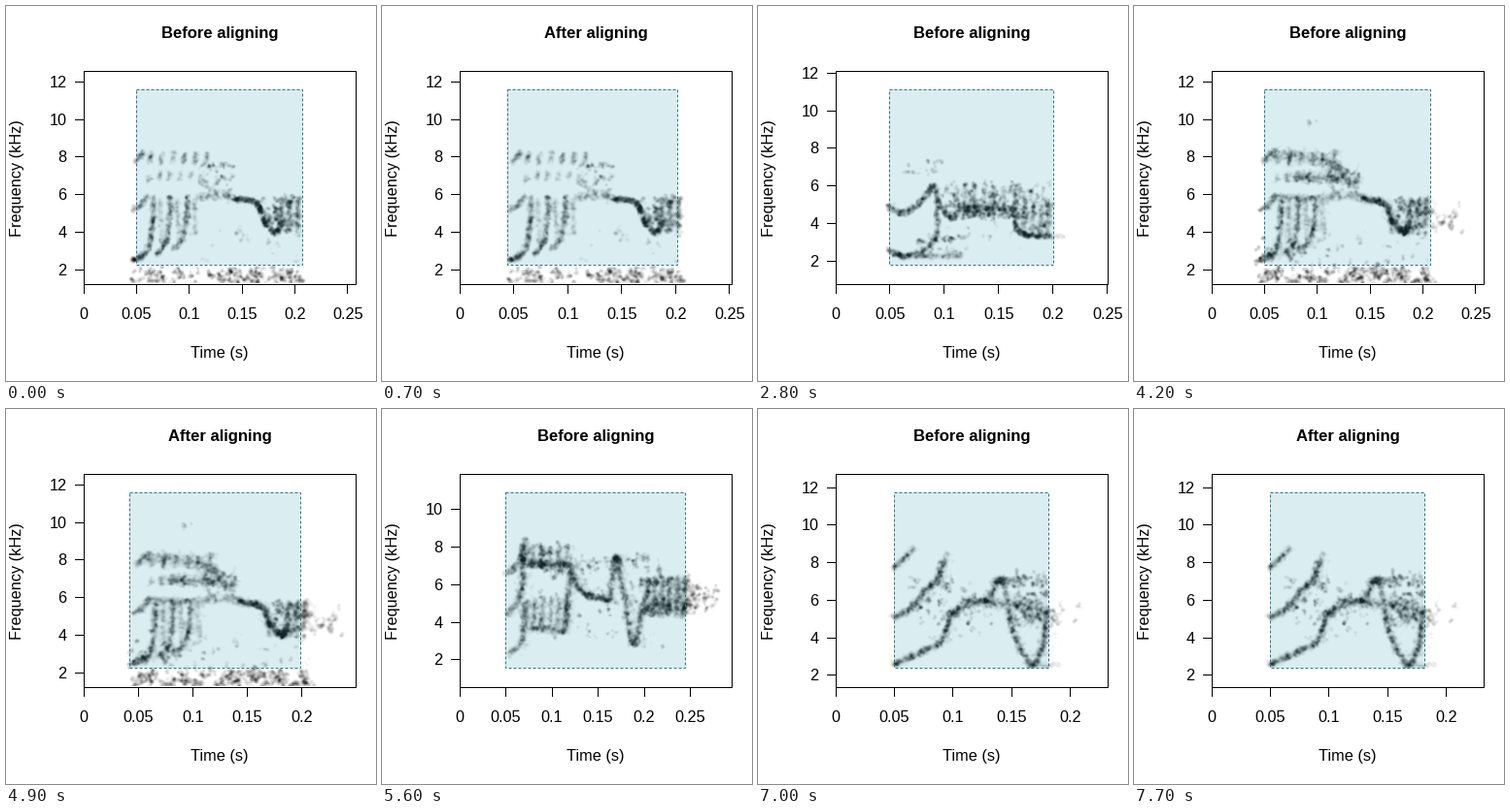
Recreate the animation shown at these times as a matplotlib script. Size 381 by 387 pixels, loop 8 s.

```python
import numpy as np
import matplotlib.pyplot as plt
from matplotlib.animation import FuncAnimation
from matplotlib.patches import Rectangle

W, H, DPI = 381, 387, 100
L, R, T, B = 79.5, 359.5, 66.5, 286.5  # plot frame in pixels
COLS, ROWS = int(R - L), int(B - T)
KHZ = ROWS / 11.35                     # pixels per kHz
PT = 72 / DPI
PAD = 0.05                             # margin around the selection, seconds
TEAL = "#07889B"

plt.rcParams["font.family"] = "Liberation Sans"


def blur(g, sigma):
    k = np.exp(-0.5 * (np.arange(-6, 7) / sigma) ** 2)
    for axis in (0, 1):
        g = np.apply_along_axis(np.convolve, axis, g, k / k.sum(), "same")
    return g


class Spectrogram:
    """Soft, grainy ink built from random stamps, in pixel coordinates."""

    def __init__(self, seed, wet):
        self.rng = np.random.default_rng(seed)
        self.wet = wet
        self.grid = np.zeros((ROWS, COLS))

    def stamp(self, x, y, weight):
        i, j = np.floor(y - T).astype(int), np.floor(x - L).astype(int)
        ok = (i >= 0) & (i < ROWS) & (j >= 0) & (j < COLS)
        np.add.at(self.grid, (i[ok], j[ok]), weight[ok])

    def curve(self, *keys, ink=0.7, width=1.3):
        """Smooth trace through a few key points; echoes smear it when wet."""
        p = np.array(keys, float)
        d = np.r_[0, np.cumsum(np.hypot(*np.diff(p, axis=0).T))]
        m = np.gradient(p, d, axis=0)
        n = int(d[-1] * 4)
        s = self.rng.uniform(0, d[-1], n)
        k = np.clip(np.searchsorted(d, s) - 1, 0, len(d) - 2)
        h = (d[k + 1] - d[k])[:, None]
        u = (s - d[k])[:, None] / h
        ease = u * u * (3 - 2 * u)
        q = (p[k] * (1 - ease) + p[k + 1] * ease
             + h * u * (1 - u) * (m[k] * (1 - u) - m[k + 1] * u))
        x, y = (q + self.rng.normal(0, width, q.shape)).T
        w = ink * 0.65 * np.hypot(1.3, width) * self.rng.uniform(0.4, 1.6, n)
        self.stamp(x, y, w * (0.85 if self.wet else 1))
        if self.wet:
            lag = self.rng.normal(-2, 2.5, n) + self.rng.exponential(4, n)
            self.stamp(x + lag, y + self.rng.normal(0, 1.2, n), w * 0.35)

    def comb(self, x0, x1, n, y0, y1, ink=0.4, lean=2):
        for x in np.linspace(x0, x1, n):
            a, b = self.rng.uniform(-2, 2, 2)
            self.curve((x - lean / 2, y1 + a), (x + lean / 2, y0 + b),
                       ink=ink * self.rng.uniform(0.7, 1.3))

    def cloud(self, x0, x1, y0, y1, n, ink=0.3):
        x, y = self.rng.uniform(x0, x1, n), self.rng.uniform(y0, y1, n)
        w = ink * 6 * self.rng.uniform(0.4, 1.6, n)
        for _ in range(3):
            self.stamp(x + self.rng.normal(0, 1.3, n),
                       y + self.rng.normal(0, 1.8, n), w)

    def image(self):
        grain = blur(self.rng.normal(0, 1, self.grid.shape), 1.2)
        g = blur(self.grid, 1.3) * np.exp(0.3 * grain / grain.std())
        rgba = np.zeros(g.shape + (4,))
        rgba[..., 3] = np.clip(0.98 - np.exp(-g), 0, 0.93)
        return rgba


def sweeps(s):
    s.curve((128, 263), (139, 259), ink=1.2)
    for k in range(3):
        x, low = 151 + 17.5 * k, 262 - 5 * k
        s.curve((x - 14, low), (x - 6, low - 9), (x - 1, 225), (x, 197), ink=0.65)
        s.curve((x + 7, 200), (x + 9, low - 15), ink=0.2)
    s.curve((130, 211), (138, 206), (146, 195), ink=0.65)
    s.curve((133, 162), (142, 151), ink=0.65)
    s.comb(148, 206, 6, 152, 163, 0.45)
    s.comb(147, 200, 6, 173, 181, 0.35)
    s.cloud(200, 232, 163, 190, 26)
    s.curve((196, 200), (216, 195), (236, 199), ink=0.35, width=2.5)
    s.curve((234, 199), (258, 205), (268, 226), (278, 234), (285, 222), ink=1.6)
    s.comb(283, 300, 3, 198, 230, 0.5)
    s.cloud(264, 304, 198, 235, 55)
    s.cloud(135, 303, 232, 264, 24, 0.13)
    s.cloud(126, 200, 271, 287, 44)
    s.cloud(208, 305, 271, 287, 85)
    if s.wet:
        s.curve((140, 153), (180, 156), (218, 174), ink=0.3, width=3)
        s.curve((165, 176), (231, 181), ink=0.35, width=3)
        s.curve((144, 197), (190, 199), ink=0.3)
        s.cloud(126, 190, 240, 264, 22)
        s.cloud(303, 338, 205, 232, 22, 0.22)
        s.cloud(125, 310, 264, 287, 60)
        s.cloud(178, 182, 120, 122, 3, 0.15)


def climb(s):
    s.curve((139, 264), (170, 250), (188, 240), (198, 213), ink=0.85)
    s.curve((198, 213), (215, 201), (237, 199), ink=1.25, width=1.9)
    s.curve((237, 199), (248, 176), (260, 220), ink=0.75)
    s.curve((258, 217), (271, 250), (283, 265), (291, 250), (297, 207), ink=0.85)
    s.curve((139, 216), (157, 206), (172, 187), (183, 178), (190, 157), ink=0.9)
    s.curve((139, 166), (156, 149), ink=0.55)
    s.curve((265, 199), (282, 218), (293, 207), ink=0.45, width=2)
    s.cloud(262, 299, 168, 225, 30)
    s.cloud(155, 240, 185, 238, 22, 0.2)
    if s.wet:
        s.curve((156, 149), (161, 143), ink=0.35)
        s.curve((188, 165), (195, 148), ink=0.3)
        s.curve((243, 177), (268, 177), ink=0.55)
        s.curve((238, 200), (290, 205), ink=0.35, width=3)
        s.cloud(155, 240, 174, 215, 40, 0.22)
        s.cloud(264, 300, 168, 222, 36, 0.3)
        s.cloud(298, 330, 200, 222, 12, 0.2)
        s.curve((290, 265), (309, 265), ink=0.2)


def ripple(s):
    s.curve((133, 252), (146, 258), (165, 256), ink=1.2)
    s.curve((165, 256), (180, 245), (184, 205), ink=0.55)
    s.curve((142, 259), (210, 258), ink=0.4)
    s.cloud(165, 212, 238, 259, 26)
    s.curve((133, 206), (148, 214), (162, 207), (181, 185), ink=0.85, width=1.7)
    s.curve((181, 185), (189, 210), (200, 219), (207, 210), ink=0.8, width=1.5)
    s.curve((206, 210), (266, 211), ink=0.9, width=4)
    s.cloud(184, 268, 182, 220, 95, 0.28)
    s.comb(212, 252, 5, 186, 218, 0.2)
    s.curve((263, 206), (269, 234), (285, 238), (302, 238), ink=1.2)
    s.comb(274, 299, 4, 203, 234, 0.3)
    s.cloud(264, 302, 182, 234, 50)
    s.cloud(143, 192, 160, 173, 11, 0.25)
    s.cloud(185, 280, 225, 256, 12, 0.18)
    s.curve((303, 238), (314, 238), ink=0.22)


def hooks(s):
    s.curve((130, 254), (141, 244), (146, 200), ink=0.6)
    s.curve((128, 213), (140, 197), (145, 150), ink=0.75)
    s.curve((128, 171), (140, 158), (147, 134), ink=0.75)
    s.curve((145, 160), (196, 161), ink=1, width=2)
    s.comb(146, 190, 6, 142, 162, 0.35)
    s.comb(148, 190, 6, 196, 227, 0.35)
    s.cloud(146, 196, 138, 168, 30)
    s.curve((152, 226), (188, 230), ink=0.55, width=1.5)
    s.curve((187, 229), (191, 195), (194, 166), ink=0.7)
    s.curve((193, 168), (208, 191), (234, 198), ink=1.25)
    s.curve((234, 198), (241, 153), (248, 190), (259, 242), (268, 205), ink=0.8)
    s.comb(272, 311, 6, 174, 214, 0.4, 3)
    s.curve((268, 208), (312, 200), ink=0.5, width=4)
    s.cloud(265, 316, 172, 214, 85, 0.28)
    s.cloud(312, 346, 184, 210, 30, 0.25)
    s.cloud(195, 285, 151, 168, 40, 0.22)
    s.cloud(150, 262, 170, 238, 44, 0.2)
    s.cloud(254, 292, 240, 246, 5, 0.18)


# draw function, seed, selection length (s), lowest frequency shown (kHz)
SWEEPS = (sweeps, 3, 0.1574, 1.23)
CLIMB = (climb, 5, 0.1319, 1.38)
RIPPLE = (ripple, 8, 0.1502, 0.77)
HOOKS = (hooks, 13, 0.1947, 0.55)

# sound, reverberant, correction applied by the alignment (s)
PAIRS = [(SWEEPS, False, -0.0056), (CLIMB, False, 0), (RIPPLE, False, 0),
         (SWEEPS, True, -0.0077), (HOOKS, True, 0), (CLIMB, True, 0)]

fig = plt.figure(figsize=(W / DPI, H / DPI), dpi=DPI, facecolor="white")
ax = fig.add_axes([0, 0, 1, 1])
ax.axis("off")


def text(x, y, label, size=16.2, **kw):
    kw = {"ha": "center", "va": "baseline"} | kw
    return ax.text(x, y, label, fontsize=size * PT, **kw)


def stroke(xs, ys):
    return ax.plot(xs, ys, color="black", lw=PT, zorder=5)[0]


def card(title, img, length, low, shift):
    """All artists of one plot whose selection is moved by shift."""
    span = length + 2 * PAD
    scale = COLS / (span + shift)
    pic = ax.imshow(img, extent=(L, L + scale * span, B, T), aspect="auto",
                    interpolation="bilinear", zorder=1)
    pic.set_clip_path(Rectangle((L, T), COLS, ROWS, transform=ax.transData))
    corner = L + (PAD + shift) * scale, T + KHZ
    box = corner, length * scale, ROWS - 2 * KHZ
    out = [pic,
           ax.add_patch(Rectangle(*box, fc=TEAL, alpha=0.15, lw=0, zorder=2)),
           ax.add_patch(Rectangle(*box, fill=False, ec="#2f7686", lw=PT,
                                  ls=(0, (3, 2)), zorder=3)),
           text(220.5, 33, title, 16.6, weight="bold")]
    for t in np.arange(0, span + shift + 1e-4, 0.05):
        x = L + t * scale
        out += [stroke([x, x], [B, B + 9]), text(x + 0.5, 323, f"{t:.2g}")]
    for f in range(2, int(low + 11.35) + 1, 2):
        y = B - (f - low) * KHZ
        out += [stroke([L - 9, L], [y, y]), text(62.5, y + 6, f"{f}", ha="right")]
    return out


cards = []
for (draw, seed, length, low), wet, shift in PAIRS:
    spec = Spectrogram(seed, wet)
    draw(spec)
    img = spec.image()
    cards.append(card("Before aligning", img, length, low, 0))
    cards.append(card("After aligning", img, length, low, shift))

stroke([L, R, R, L, L], [T, T, B, B, T])
text(220, 363, "Time (s)")
text(12, 177.5, "Frequency (kHz)", rotation=90, va="center")
ax.set(xlim=(0, W), ylim=(H, 0))

STEP, HOLD, LOOP = 100, 700, 8000


def update(i):
    now = i * STEP // HOLD
    for k, artists in enumerate(cards):
        for a in artists:
            a.set_visible(k == now)
    return []


anim = FuncAnimation(fig, update, frames=LOOP // STEP, interval=STEP,
                     repeat=True, repeat_delay=0, blit=False)
plt.show()
```
